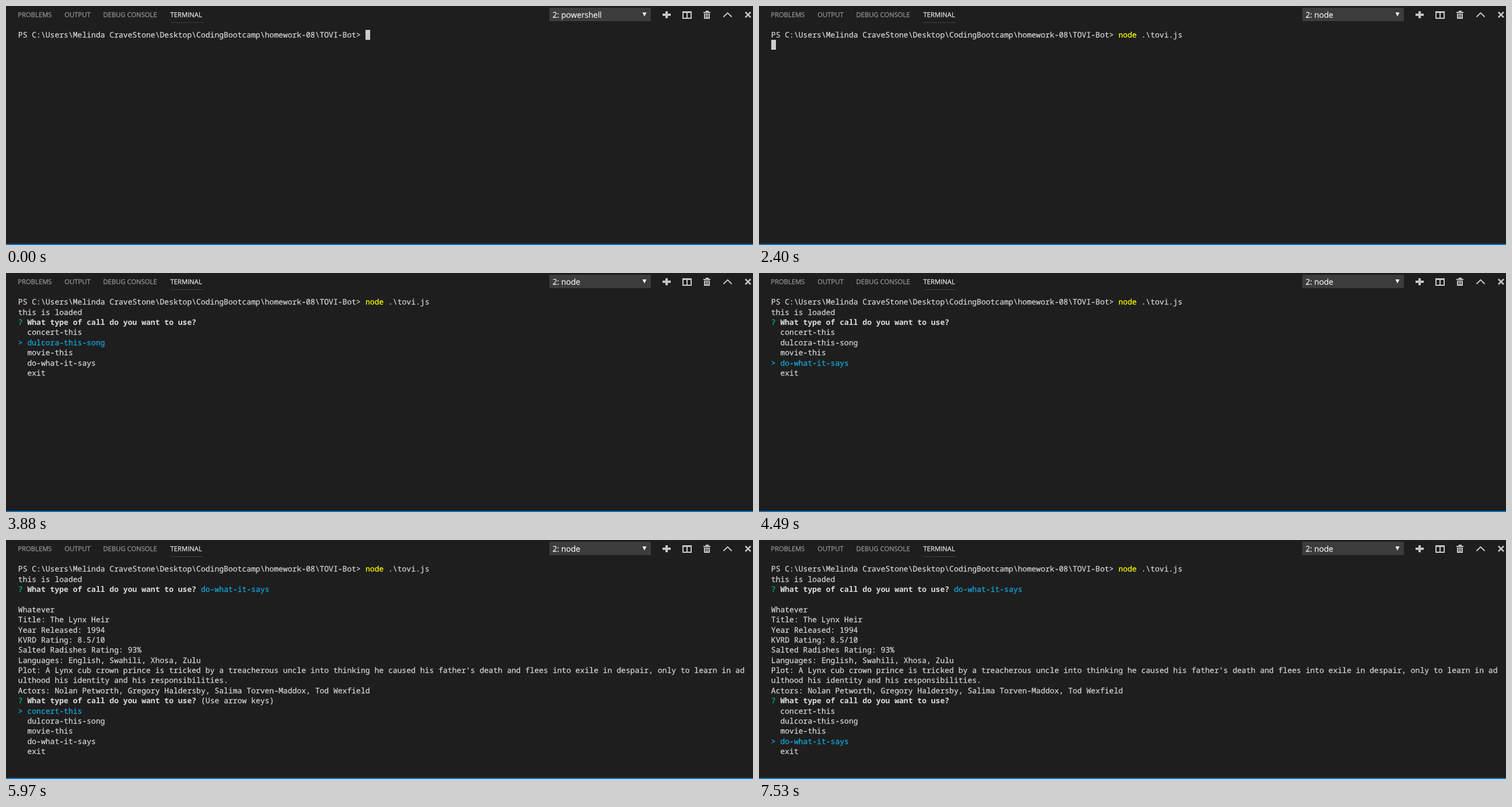
Recreate the animation shown at these times as an HTML page. Size 1280 by 410 pixels, loop 8 s.

```html
<!DOCTYPE html>
<html lang="en">
<head>
<meta charset="utf-8">
<title>Terminal</title>
<style>
  html, body { margin: 0; width: 100%; height: 100%; overflow: hidden; background: #1e1e1e; }
  svg { display: block; width: 100%; height: 100%; }
  text { white-space: pre; text-rendering: geometricPrecision; fill: currentColor; stroke: currentColor; stroke-width: .25px; }
  .tabs { font: 11.25px "Open Sans", sans-serif; color: #979797; }
  .tabs .active { color: #e7e7e7; }
  #shell { font: 13.6px "Open Sans", sans-serif; color: #f0f0f0; }
  #screen { font: 13.05px "Noto Sans Mono", monospace; color: #d4d4d4; }
  #screen .bold { font-weight: bold; color: #dcdcdc; stroke: none; }
  #screen .yellow { color: #ff0; }
  #screen .green { color: #0dbc79; }
  #screen .cyan { color: #14a8dc; }
  .icons { fill: #c5c5c5; }
</style>
</head>
<body>
<svg viewBox="0 0 1280 410">
  <rect width="1280" height="410" fill="#1e1e1e"/>
  <rect y="408" width="1280" height="2" fill="#0a6fb8"/>
  <g class="tabs">
    <text x="20.3" y="19">PROBLEMS</text>
    <text x="100.3" y="19">OUTPUT</text>
    <text x="166.5" y="19">DEBUG CONSOLE</text>
    <text x="281.6" y="19" class="active">TERMINAL</text>
  </g>
  <rect x="282" y="28" width="56" height="1" fill="#404040"/>
  <rect x="931" y="3" width="174" height="23" fill="#3c3c3c"/>
  <text id="shell" x="936.5" y="20"></text>
  <path d="M1090.500 11h7l-3.500 7z" fill="#f0f0f0"/>
  <g class="icons">
    <path d="M1130 9h4v4h5v4h-5v4h-4v-4h-5v-4h5z"/>
    <path fill-rule="evenodd" d="M1159 9h16v13h-16z M1161 12h5v8h-5z M1168 12h5v8h-5z"/>
    <path fill-rule="evenodd" d="M1199 8h5v2h3v2h-12v-2h4z M1196 13h10v9h-10z M1198 14v6h1v-6z M1200.500 14v6h1v-6z M1203 14v6h1v-6z"/>
    <path d="M1229.500 18.800l7-7 7 7" fill="none" stroke="#c5c5c5" stroke-width="2"/>
    <path d="M1267 10.500l9 9m0-9l-9 9" fill="none" stroke="#c5c5c5" stroke-width="2.600"/>
  </g>
  <g id="screen"></g>
</svg>
<script>
const LOOP = 8000;
const LEFT = 20.8, TOP = 41, BASELINE = 13.2;
const CELL_W = 7.83, CELL_H = 17.39;

const PROMPT = String.raw`PS C:\Users\Melinda CraveStone\Desktop\CodingBootcamp\homework-08\TOVI-Bot> `;
const COMMAND = [["node", "yellow"], [String.raw` .\tovi.js`]];
const QUESTION = [["? ", "green"], ["What type of call do you want to use? ", "bold"]];
const CHOICES = ["concert-this", "dulcora-this-song", "movie-this", "do-what-it-says", "exit"];
const MOVIE = [
  "Title: The Lynx Heir",
  "Year Released: 1994",
  "KVRD Rating: 8.5/10",
  "Salted Radishes Rating: 93%",
  "Languages: English, Swahili, Xhosa, Zulu",
  "Plot: A Lynx cub crown prince is tricked by a treacherous uncle into thinking he caused his father's death and flees into exile in despair, only to learn in ad",
  "ulthood his identity and his responsibilities.",
  "Actors: Nolan Petworth, Gregory Haldersby, Salima Torven-Maddox, Tod Wexfield",
];

const shell = document.getElementById("shell");
const screen = document.getElementById("screen");
const plain = text => [[text]];

// A line is a list of [text, style] runs placed on the character grid.
function drawLine(runs, row) {
  let column = 0;
  const y = Math.round(TOP + BASELINE + row * CELL_H);
  return runs.map(([text, style = ""]) => {
    const x = LEFT + column * CELL_W;
    column += text.length;
    return `<text class="${style}" x="${x}" y="${y}">${text.replace(">", "&gt;")}</text>`;
  }).join("");
}

function drawCursor(column, row) {
  const x = Math.round(LEFT + column * CELL_W), y = Math.round(TOP + row * CELL_H);
  return `<rect x="${x}" y="${y}" width="8" height="17" fill="#ccc"/>`;
}

// Each key press moves the selection down one choice.
function menu(time, keyPresses) {
  const selected = keyPresses.filter(press => time >= press).length;
  return [
    selected ? QUESTION : [...QUESTION, ["(Use arrow keys)"]],
    ...CHOICES.map((choice, i) =>
      i === selected ? [["> " + choice, "cyan"]] : plain("  " + choice)),
  ];
}

function terminalAt(time) {
  const lines = [time < 1390 ? plain(PROMPT) : [[PROMPT], ...COMMAND]];
  let cursor = null;
  if (time < 1390) cursor = [76, 0];
  else if (time < 2330) cursor = [90, 0];
  else if (time < 3030) cursor = [0, 1];
  else {
    lines.push(plain("this is loaded"));
    if (time < 5900) lines.push(...menu(time, [3880, 4110, 4490]));
    else {
      lines.push([...QUESTION, [CHOICES[3], "cyan"]], [], plain("Whatever"));
      if (time < 5970) cursor = [0, 5];
      else lines.push(...MOVIE.map(plain), ...menu(time, [6920, 7070, 7530]));
    }
  }
  return lines.map(drawLine).join("") + (cursor ? drawCursor(...cursor) : "");
}

let shown;
function frame() {
  const time = performance.now() % LOOP;
  const title = time < 2400 ? "2: powershell" : "2: node";
  const markup = terminalAt(time);
  if (title + markup !== shown) {
    shell.textContent = title;
    screen.innerHTML = markup;
    shown = title + markup;
  }
  requestAnimationFrame(frame);
}
frame();
</script>
</body>
</html>
```
